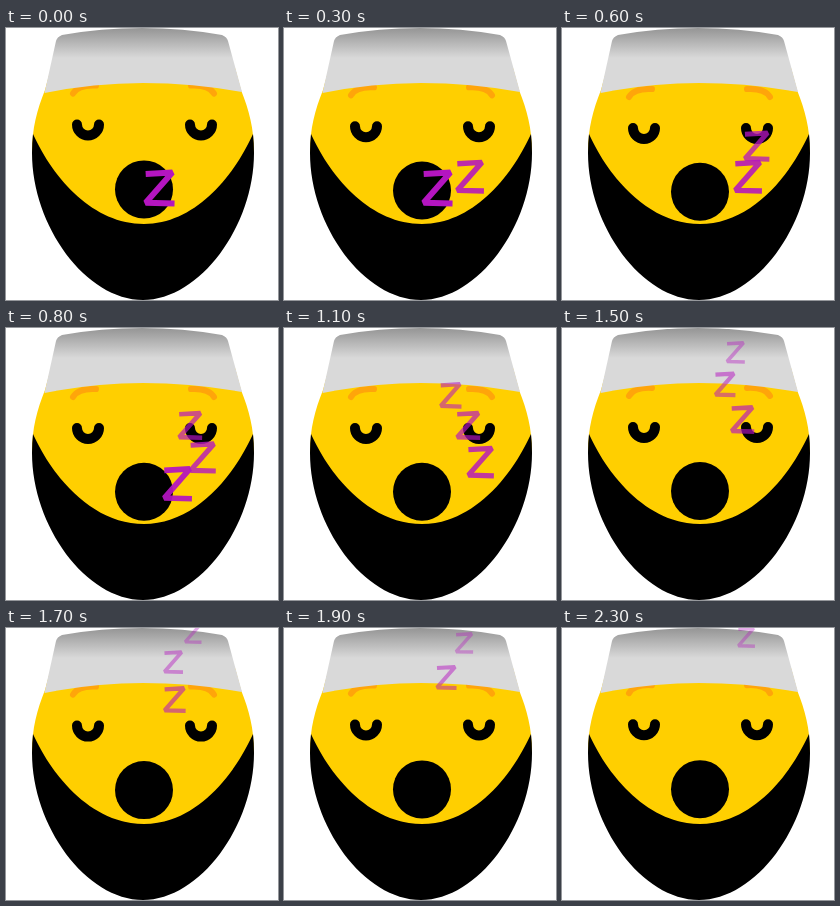
Recreate the animation shown at these times as an HTML page. Size 272 px wide and 272 px high, loop 2.4 s.

```html
<!DOCTYPE html>
<html lang="en">
<head>
<meta charset="utf-8">
<title>Sleeping face</title>
<style>
  html, body { margin: 0; width: 100%; height: 100%; overflow: hidden; background: #fff; }
  svg { display: block; width: 100vw; height: 100vh; }
</style>
</head>
<body>
<svg viewBox="0 0 272 272">
  <defs>
    <linearGradient id="shade" gradientUnits="userSpaceOnUse" x1="0" y1="2" x2="0" y2="30">
      <stop offset="0" stop-color="#999"/>
      <stop offset="1" stop-color="#d9d9d9"/>
    </linearGradient>
    <path id="drift" d="M153 160C170 158 200 148 196 128C196 105 162 75 162 50C162 35 178 20 200 -14L214 -36"/>
    <path id="zed" d="M-.36 -.38L.36 -.42L-.36 .4L.42 .42" fill="none" stroke="#b415c0" stroke-width=".16" stroke-linejoin="bevel"/>
  </defs>
  <path fill="#ffcf00" d="M45 40L39 62C31 82 26 100 26 125Q60 205 137 205Q214 205 248 125C248 100 243 82 235 62L229 40Z"/>
  <path d="M27 106C48 152 88 196 138 196C187 196 226 152 247 106Q248 115 248 125C248 198 194 272 137 272C80 272 26 198 26 125Q26 115 27 106Z"/>
  <g id="brows" fill="none" stroke="#ffa50a" stroke-width="6" stroke-linecap="round">
    <path d="M67 65Q72 56 90 57"/>
    <path d="M208 65Q203 56 185 57"/>
  </g>
  <g id="eyes" fill="none" stroke="#000" stroke-width="10" stroke-linecap="round">
    <path d="M71 96A11 11 0 0 0 93 96"/>
    <path d="M184 96A11 11 0 0 0 206 96"/>
  </g>
  <circle id="mouth" cx="138" cy="161" r="29"/>
  <path fill="url(#shade)" d="M38.5 65L50 13Q51 9 56 7Q95 0 136 0Q177 0 216 7Q221 9 222 13L236 64Q187 55 137 55Q88 55 38.5 65Z"/>
  <g id="snores"><use href="#zed"/><use href="#zed"/><use href="#zed"/></g>
</svg>
<script>
const LOOP = 2400, STEP = 100;
const SPEED = .116; // letter travel, px per ms
const starts = [0, 300, 640];

const find = id => document.getElementById(id);
const [brows, eyes, mouth, drift] = ["brows", "eyes", "mouth", "drift"].map(find);
const letters = [...find("snores").children];
const driftLength = drift.getTotalLength();

// The features sink, rest at the lowest point, then rise again.
const breath = t => Math.min(4, 2.6 + 2.6 * Math.cos(2 * Math.PI * (t - 950) / LOOP));

const shiftDown = (part, y) => part.setAttribute("transform", `translate(0 ${y})`);

function drawLetter(letter, age) {
  const distance = age * SPEED;
  const visible = age >= 0 && distance < driftLength;
  letter.setAttribute("visibility", visible ? "visible" : "hidden");
  if (!visible) return;
  const { x, y } = drift.getPointAtLength(distance);
  letter.setAttribute("transform", `translate(${x} ${y}) scale(${37 - age * .0095})`);
  letter.setAttribute("opacity", Math.max(.35, 1 - age * .0004));
}

function draw(t) {
  const shift = breath(t);
  shiftDown(brows, shift);
  shiftDown(eyes, shift);
  shiftDown(mouth, shift * .7);
  letters.forEach((letter, i) => drawLetter(letter, t - starts[i]));
}

function tick() {
  draw(Math.floor(performance.now() % LOOP / STEP) * STEP);
  requestAnimationFrame(tick);
}
tick();
</script>
</body>
</html>
```
